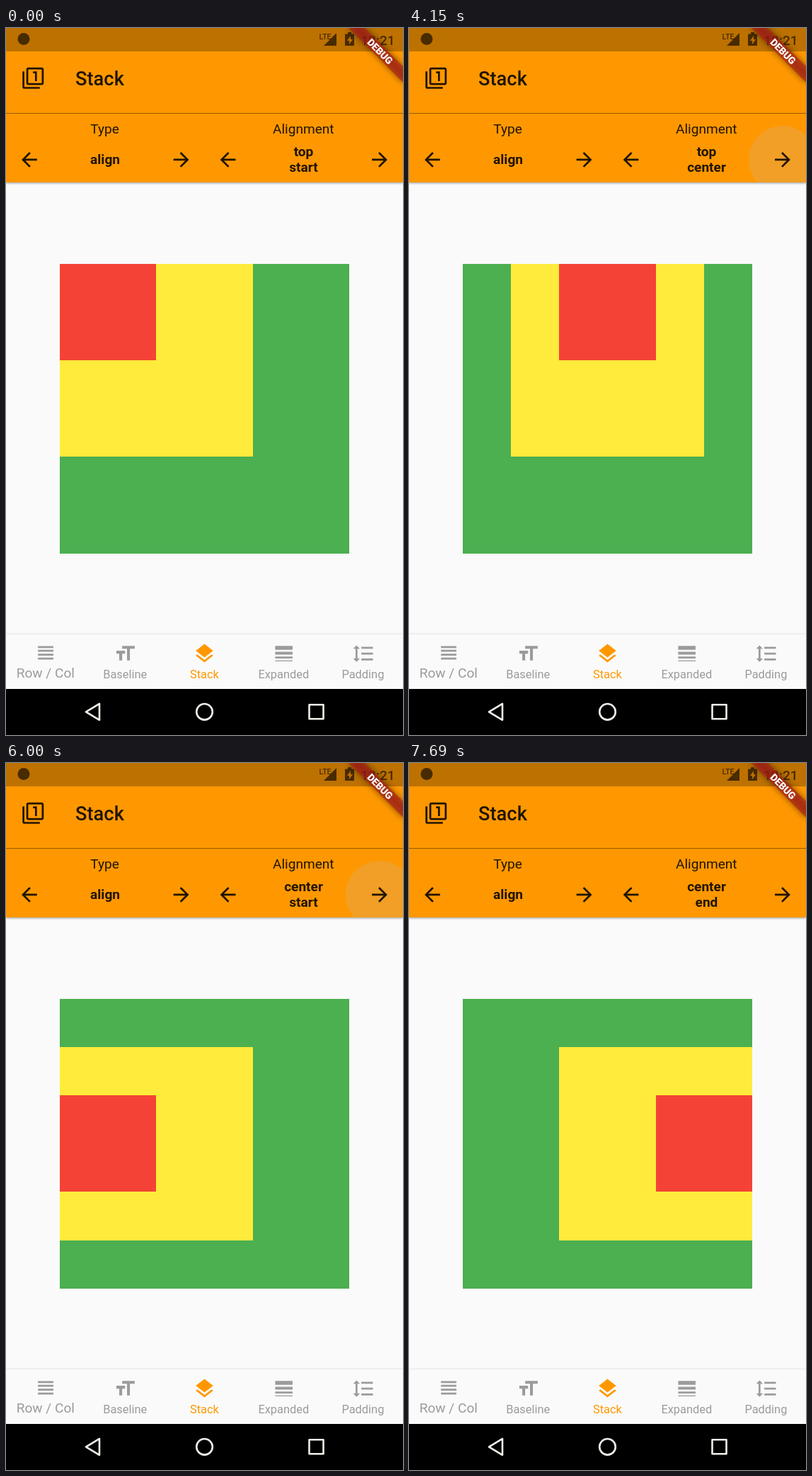
An HTML page that plays this animation: 561 px wide and 998 px high, repeating every 8000 ms.

```html
<!DOCTYPE html>
<html lang="en">
<head>
<meta charset="utf-8">
<title>Stack alignment</title>
<style>
  html, body { margin: 0; width: 100%; height: 100%; overflow: hidden; background: #000; }
  body { position: relative; font-family: Roboto, "Open Sans", sans-serif; }
  div, svg { position: absolute; }

  .page { left: 0; top: 0; width: 561px; height: 933px; background: #fafafa; overflow: hidden; }
  .bar { left: 0; top: 0; width: 561px; height: 218px; background: #ff9800; box-shadow: 0 1px 3px rgba(0,0,0,.4); }
  .status { left: 0; top: 0; width: 561px; height: 33px; background: rgba(0,0,0,.26); }
  .rule { left: 0; top: 120px; width: 561px; height: 1px; background: rgba(0,0,0,.42); }
  .tabs { left: 0; top: 856px; width: 561px; height: 77px; background: #fafafa; box-shadow: 0 0 3px rgba(0,0,0,.16); }

  /* nested boxes share one offset: each moves by half the slack of its parent */
  .green, .yellow, .red { --u: 68.2px; }
  .green { left: 75.8px; top: 332.6px; width: 409.2px; height: 409.2px; background: #4caf50; }
  .yellow { width: 272.8px; height: 272.8px; background: #ffeb3b; }
  .red { width: 136.4px; height: 136.4px; background: #f44336; }
  .yellow, .red { left: 0; top: 0; animation: align 8s step-end infinite; }
  @keyframes align {
    0%      { left: 0; top: 0; }
    43.25%  { left: var(--u); top: 0; }
    52.375% { left: calc(2 * var(--u)); top: 0; }
    62.125% { left: 0; top: var(--u); }
    75.5%   { left: var(--u); top: var(--u); }
    94.125%, 100% { left: calc(2 * var(--u)); top: var(--u); }
  }

  .window { left: 360px; top: 146px; width: 121px; height: 80px; overflow: hidden; }
  .strip { left: 0; top: 0; width: 121px; animation: label 8s step-end infinite; }
  .strip p {
    margin: 0; height: 80px; display: flex; align-items: center; justify-content: center;
    text-align: center; font-size: 19.1px; line-height: 22px; font-weight: 700; color: rgba(0,0,0,.87);
  }
  @keyframes label {
    0%      { top: 0; }
    43.25%  { top: -80px; }
    52.375% { top: -160px; }
    62.125% { top: -240px; }
    75.5%   { top: -320px; }
    94.125%, 100% { top: -400px; }
  }

  .ink { left: 470px; top: 130px; width: 91px; height: 88px; overflow: hidden; }
  .ink div { width: 96px; height: 96px; border-radius: 50%; opacity: 0; }
  .glow { left: 10px; top: 8px; background: #bcbcbc; animation: glow 8s linear infinite; }
  .splash { left: 17px; top: 4px; background: #c8c8c8; transform: scale(0); animation: splash 8s linear infinite; }
  @keyframes glow {
    0%, 43.24% { opacity: 0; }
    43.25%  { opacity: .2; }
    44.25%, 50.2% { opacity: 0; }
    51.875% { opacity: .2; }
    52.375% { opacity: .25; }
    54.5%, 58.3% { opacity: 0; }
    61%     { opacity: .37; }
    62.125% { opacity: .39; }
    64.625%, 72.8% { opacity: 0; }
    75%     { opacity: .2; }
    75.5%   { opacity: .25; }
    77.125%, 92.5% { opacity: 0; }
    94.125% { opacity: .24; }
    96.125%, 100% { opacity: 0; }
  }
  @keyframes splash {
    0%, 52.3% { opacity: 0; transform: scale(.06); }
    52.375% { opacity: .2; transform: scale(.1); }
    54.5%   { opacity: 0; transform: scale(.9); }
    58.4%   { opacity: 0; transform: scale(0); }
    61%     { opacity: .3; transform: scale(.12); }
    62.125% { opacity: .3; transform: scale(.2); }
    64.625% { opacity: 0; transform: scale(1); }
    75.4%   { opacity: 0; transform: scale(.06); }
    75.5%   { opacity: .2; transform: scale(.1); }
    77.125% { opacity: 0; transform: scale(.9); }
    94%     { opacity: 0; transform: scale(.06); }
    94.125% { opacity: .2; transform: scale(.1); }
    96.125%, 100% { opacity: 0; transform: scale(.9); }
  }

  .art { left: 0; top: 0; }
  text { text-anchor: middle; }
  .head { font-size: 19.1px; }
  .tab { font-size: 16.4px; }

  .banner, .shade { left: 473.7px; top: 24.6px; width: 109px; height: 16.4px; transform: rotate(45deg); }
  .shade { background: rgba(0,0,0,.5); filter: blur(5px); }
  .banner {
    background: rgba(183,28,28,.63); color: #fff; text-align: center;
    font-size: 13.9px; line-height: 16.4px; font-weight: 900;
  }
</style>
</head>
<body>
<div class="page">
  <div class="bar">
    <div class="status"></div>
    <div class="rule"></div>
    <div class="ink"><div class="glow"></div><div class="splash"></div></div>
    <div class="window"><div class="strip">
      <p>top<br>start</p><p>top<br>center</p><p>top<br>end</p>
      <p>center<br>start</p><p>center</p><p>center<br>end</p>
    </div></div>
  </div>
  <div class="green"><div class="yellow"><div class="red"></div></div></div>
  <div class="tabs"></div>
</div>

<svg class="art" width="561" height="998" viewBox="0 0 561 998">
  <defs>
    <path id="back" d="M20 11H7.83l5.59-5.59L12 4l-8 8 8 8 1.41-1.41L7.83 13H20v-2z"/>
    <path id="next" d="M12 4l-1.41 1.41L16.17 11H4v2h12.17l-5.58 5.59L12 20l8-8z"/>
  </defs>

  <g fill="#000" fill-opacity=".62">
    <circle cx="25" cy="15.5" r="8.5"/>
    <text x="451" y="16" font-size="10.5" font-weight="500">LTE</text>
    <path d="M467 7v18h-18z"/>
    <path fill-rule="evenodd" d="M479 8.5h4V6h5v2.5h4V25h-13zM487 11l-5 7h3v5l5-7h-3z"/>
    <text x="525.5" y="24" font-size="19.1" font-weight="500">12:21</text>
  </g>

  <g fill="#000" fill-opacity=".87">
    <path transform="translate(21.9 54.5) scale(1.3636)" d="M3 5H1v16c0 1.1.9 2 2 2h16v-2H3V5zm11 10h2V5h-4v2h2v8zm7-14H7c-1.1 0-2 .9-2 2v14c0 1.1.9 2 2 2h14c1.1 0 2-.9 2-2V3c0-1.1-.9-2-2-2zm0 16H7V3h14v14z"/>
    <text x="98" y="81" font-size="27.3" font-weight="500" style="text-anchor:start">Stack</text>
    <text class="head" x="139.5" y="149">Type</text>
    <text class="head" x="420.3" y="149">Alignment</text>
    <text class="head" x="140" y="192" font-weight="700">align</text>
    <use href="#back" transform="translate(16.6 169.6) scale(1.3636)"/>
    <use href="#next" transform="translate(231.2 169.6) scale(1.3636)"/>
    <use href="#back" transform="translate(297.2 169.6) scale(1.3636)"/>
    <use href="#next" transform="translate(511.6 169.6) scale(1.3636)"/>
  </g>

  <g fill="#9b9b9b">
    <path transform="translate(39.7 865.6) scale(1.3636)" d="M4 15h16v-2H4v2zm0 4h16v-2H4v2zm0-8h16V9H4v2zm0-6v2h16V5H4z"/>
    <path transform="translate(151.9 866.8) scale(1.3636)" d="M9 4v3h5v12h3V7h5V4H9zm-6 8h3v7h3v-7h3V9H3v3z"/>
    <path transform="translate(264.1 866.8) scale(1.3636)" fill="#ff9800" d="M11.99 18.54l-7.37-5.73L3 14.07l9 7 9-7-1.63-1.27-7.38 5.74zM12 16l7.36-5.73L21 9l-9-7-9 7 1.63 1.27L12 16z"/>
    <path transform="translate(376.3 866.8) scale(1.3636)" d="M3 17h18v-2H3v2zm0 3h18v-1H3v1zm0-7h18v-3H3v3zm0-9v4h18V4H3z"/>
    <path transform="translate(488.5 866.8) scale(1.3636)" d="M6 7h2.5L5 3.5 1.5 7H4v10H1.5L5 20.5 8.5 17H6V7zm4-2v2h12V5H10zm0 14h12v-2H10v2zm0-6h12v-2H10v2z"/>
    <text class="head" x="55.8" y="916.5">Row / Col</text>
    <text class="tab" x="168.2" y="918">Baseline</text>
    <text class="tab" x="280.4" y="918" fill="#ff9800">Stack</text>
    <text class="tab" x="392.3" y="918">Expanded</text>
    <text class="tab" x="504.4" y="918">Padding</text>
  </g>

  <g fill="none" stroke="#f0f0e8" stroke-width="2.6" stroke-linejoin="round">
    <path d="M113 965.3L132 953.8v23z"/>
    <circle cx="280.5" cy="965.3" r="11.3"/>
    <path d="M428.5 955.3h20v20h-20z"/>
  </g>
</svg>

<div class="shade"></div>
<div class="banner">DEBUG</div>
</body>
</html>
```
